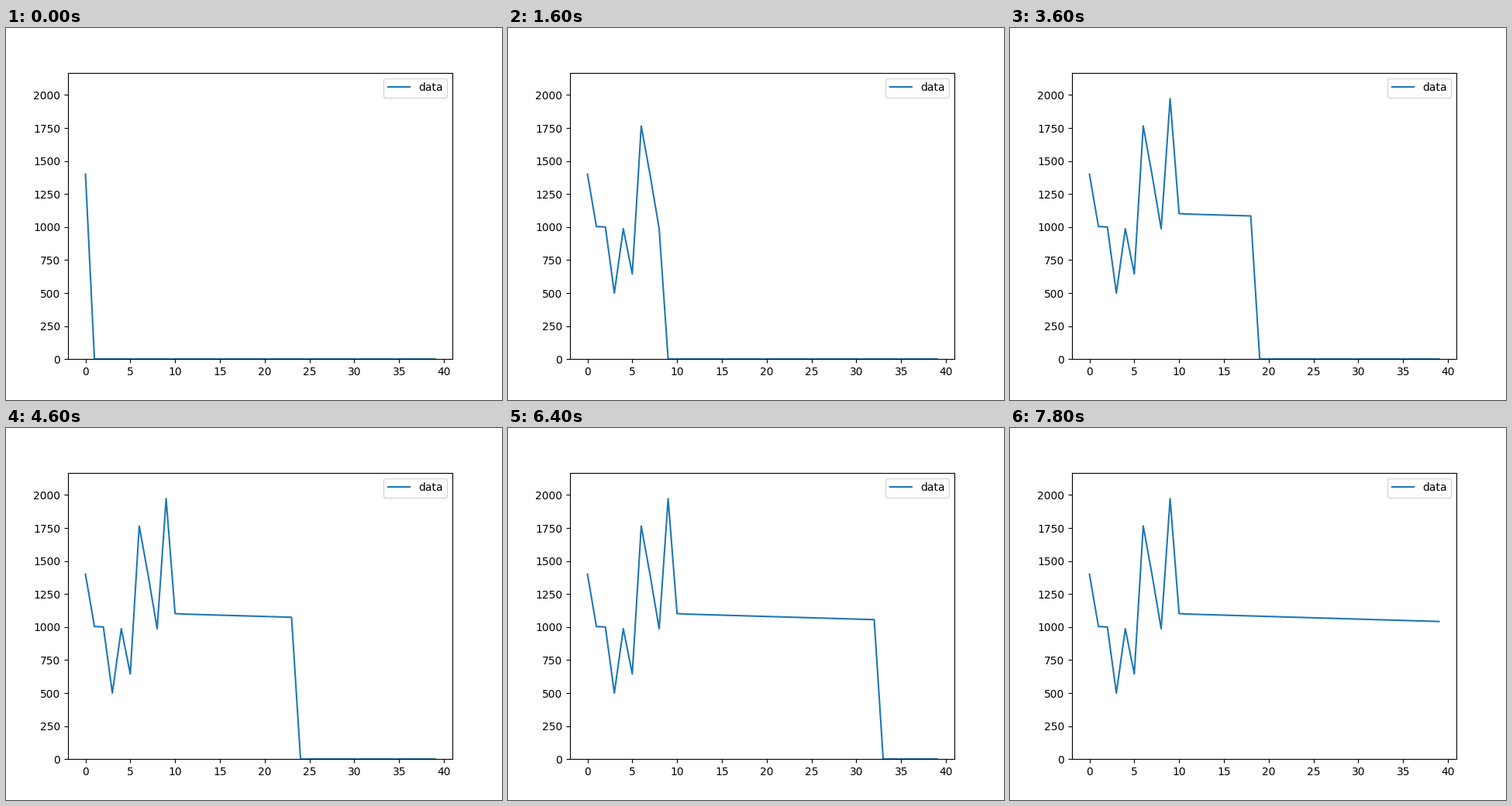
Recreate the animation shown at these times as a matplotlib script. Size 640x480 px, loop 8 s.

```python
import matplotlib.pyplot as plt
import numpy as np
from matplotlib.animation import FuncAnimation

N = 40
STEP_MS = 200

# A jagged start, then a straight slow decline to the last sample.
peaks = [1400, 1004, 1000, 500, 987, 645, 1765, 1390, 987, 1972, 1102]
x = np.arange(N)
data = np.interp(x, [*range(len(peaks)), 11, N - 1], [*peaks, 1098, 1042])

fig, ax = plt.subplots(figsize=(6.4, 4.8), dpi=100)
line, = ax.plot(x, np.zeros(N), label="data")
ax.set_ylim(0, data.max() * 1.1)
ax.legend(loc="upper right")


def update(i):
    """Reveal the samples up to i; the rest stay at zero."""
    line.set_ydata(np.where(x <= i, data, 0))
    return line,


anim = FuncAnimation(fig, update, frames=N, interval=STEP_MS,
                     repeat=True, repeat_delay=0)
plt.show()
```
